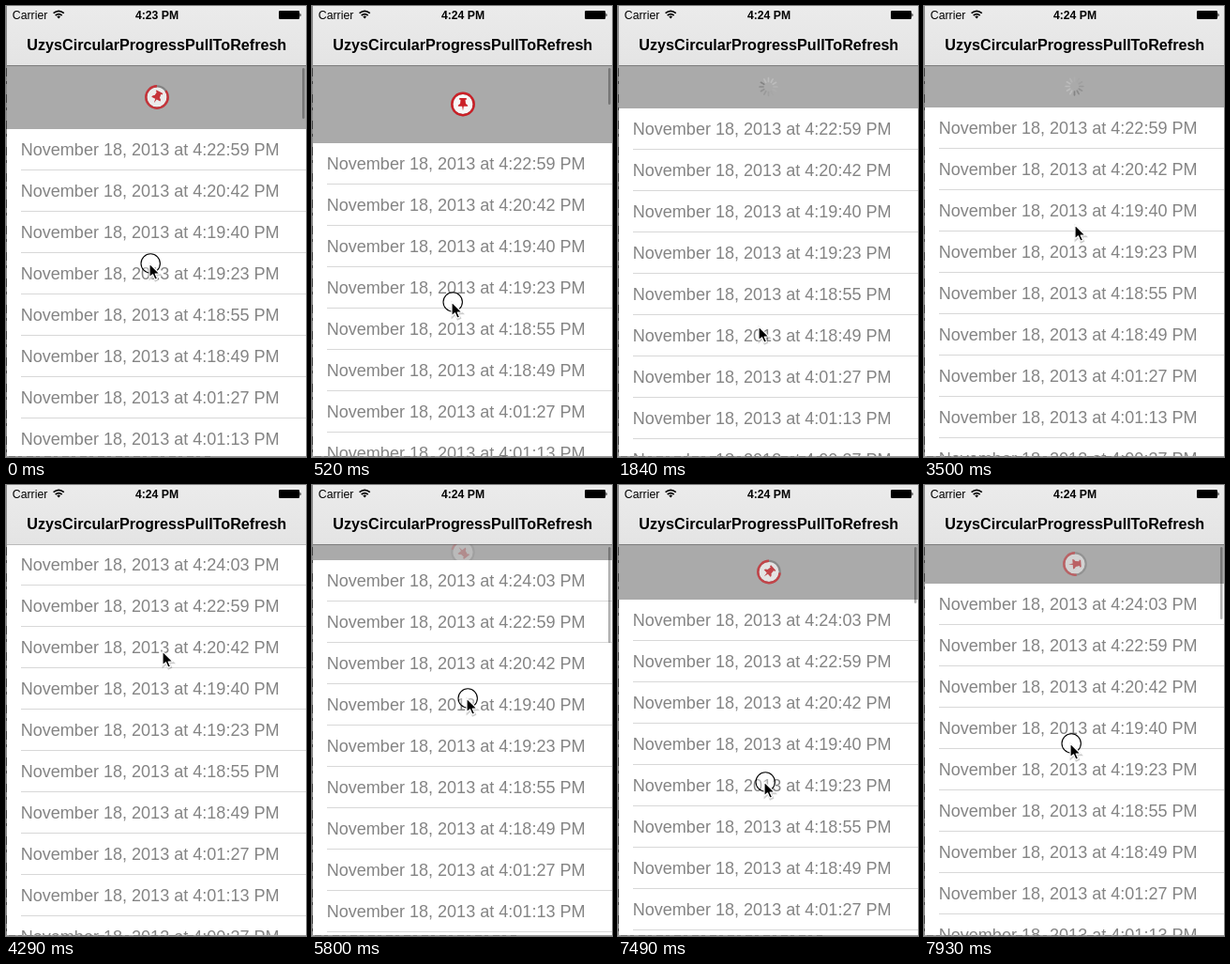
An HTML page that plays this animation: 320x480 px, repeating every 8000 ms.

```html
<!DOCTYPE html>
<html lang="en">
<head>
<meta charset="utf-8">
<title>Pull to refresh</title>
<style>
  html, body { margin: 0; width: 100%; height: 100%; overflow: hidden; background: #fff; }
  svg { display: block; width: 320px; height: 480px; }
  text { font-family: "Liberation Sans", Arial, sans-serif; }
  .row text { font-size: 18.06px; fill: #848484; }
  .bold { font-weight: bold; text-anchor: middle; }
</style>
</head>
<body>
<svg viewBox="0 0 320 480">
  <defs>
    <linearGradient id="barFill" x2="0" y2="1">
      <stop offset="0" stop-color="#ebebeb"/>
      <stop offset="1" stop-color="#e4e4e4"/>
    </linearGradient>
    <path id="arrow" d="M0 0V15l3.5-3.2 2.4 5.4 2.6-1.1-2.3-5.1H11z"/>
  </defs>
  <rect width="320" height="480" fill="#aaa"/>

  <g id="badge">
    <circle r="11.7" fill="#f8f8f8" stroke="#7d7d7d" stroke-width="2.2"/>
    <path id="pin" fill="#cb2027" d="M-3.8-6.5h7.6v1.7h-1.3l.5 4.2q2.3.9 2.3 2.9H.8L0 7-.8 2.3h-4.5q0-2 2.3-2.9l.5-4.2h-1.3z"/>
    <circle id="ring" r="11.7" fill="none" stroke="#cb2027" stroke-width="2.4" pathLength="100" transform="scale(-1 1) rotate(-90)"/>
  </g>
  <g id="spinner"></g>

  <g id="list">
    <g id="fresh"></g>
    <g id="rows"></g>
  </g>
  <rect id="bar" x="316" y="66" width="2.5" rx="1.25" fill="#000" fill-opacity=".3"/>

  <rect width="320" height="63" fill="url(#barFill)"/>
  <rect y="63" width="320" height="1" fill="#000" fill-opacity=".27"/>
  <text x="6.8" y="13.5" font-size="12.3">Carrier</text>
  <g fill="none" stroke="#000" stroke-width="1.7">
    <path d="M50.6 7.7q5.6-4.6 11.2 0M52.7 10q3.5-2.8 7 0"/>
    <path d="M56.2 13.4l-1.9-2.2q1.9-1.3 3.8 0z" fill="#000" stroke="none"/>
  </g>
  <text id="clock" class="bold" x="161" y="13.5" font-size="12.2"></text>
  <rect x="291" y="5" width="22" height="9" rx="1.2"/>
  <path d="M313.5 7.4q2.2 2.1 0 4.2z"/>
  <text class="bold" x="160.8" y="47" font-size="16.15">UzysCircularProgressPullToRefresh</text>

  <path d="M.5 0V480" stroke="#8a8a8a"/>
  <path d="M.5 66V480" stroke="#444" stroke-dasharray="9 5 3 11"/>
  <path d="M0 479.5H320" stroke="#9a9a9a"/>
  <path d="M3 479.5H218" stroke="#444" stroke-opacity=".4" stroke-dasharray="7 3 4 5"/>

  <g id="cursor">
    <circle id="touch" cx="1.2" cy="0" r="10.2" fill="#fff" fill-opacity=".35" stroke="#000" stroke-width="1.1"/>
    <use href="#arrow" x=".6" y="1.2" stroke="#000" stroke-width="2" stroke-opacity=".2" fill="none"/>
    <use href="#arrow" stroke="#fff" stroke-width="1.2" stroke-linejoin="round"/>
  </g>
</svg>
<script>
const LOOP = 8000, TOP = 63, ROW = 44, THRESHOLD = 80, HOLD = 45;
const RELEASE = 1300, LOADED = 3600, CLOSED = 4050, TOUCH = 5090, PRESS = 5270, DRAG = 5540;

// [time, value...]
const pullKeys = [[0, 68], [1050, 95], [RELEASE, 97], [1700, 47], [1840, 46], [2000, HOLD],
  [LOADED, HOLD], [CLOSED, 0], [DRAG, 0], [5800, 17], [6420, 71], [6780, 76], [7000, 77],
  [7220, 72], [7930, 42], [LOOP, 42]];
const cursorKeys = [[0, 153, 274], [1050, 147, 345], [RELEASE, 147, 349], [1840, 150, 341],
  [2500, 150, 341], [4150, 167, 177], [5000, 167, 177], [TOUCH, 166, 181], [PRESS, 166, 182],
  [DRAG, 166, 191], [5800, 165, 227], [6420, 159, 343], [6780, 156, 357], [7000, 156, 359],
  [7220, 156, 347], [7930, 156, 275], [LOOP, 156, 275]];
const times = ["22:59", "20:42", "19:40", "19:23", "18:55", "18:49", "01:27", "01:13", "00:37", "00:21"];

const $ = id => document.getElementById(id);
const clamp = (v, lo = 0, hi = 1) => Math.min(hi, Math.max(lo, v));
const show = (id, on) => $(id).setAttribute("visibility", on ? "visible" : "hidden");
const move = (id, x, y) => $(id).setAttribute("transform", `translate(${x} ${y})`);

// Monotone cubic interpolation through column c of the keys
function sample(keys, t, c = 1) {
  const slope = i => keys[i + 1] ? (keys[i + 1][c] - keys[i][c]) / (keys[i + 1][0] - keys[i][0]) : 0;
  const tangent = i => {
    if (!i) return slope(0);
    const a = slope(i - 1), b = slope(i);
    return a * b > 0 ? 2 * a * b / (a + b) : 0;
  };
  let i = 0;
  while (i < keys.length - 2 && t >= keys[i + 1][0]) i++;
  const a = keys[i], b = keys[i + 1], h = b[0] - a[0], u = (t - a[0]) / h, v = 1 - u;
  return v * v * (1 + 2 * u) * a[c] + u * u * (3 - 2 * u) * b[c]
    + h * u * v * (v * tangent(i) - u * tangent(i + 1));
}

const rowMarkup = (time, y, id) => `<g class="row" transform="translate(0 ${y})">
  <rect ${id ? `id="${id}"` : ""} width="320" height="${ROW}" fill="#fff"/>
  <rect x="16" y="43" width="304" height="1" fill="#d8d8d8"/>
  <text x="15.7" y="28">November 18, 2013 at 4:${time} PM</text></g>`;

$("fresh").innerHTML = rowMarkup("24:03", 0);
$("rows").innerHTML = times.map((time, i) => rowMarkup(time, i * ROW, i === 1 ? "pressed" : "")).join("");
$("spinner").innerHTML = Array.from({ length: 12 }, (_, i) =>
  `<path d="M0-5.5V-9.3" stroke-width="1.7" stroke-linecap="round" transform="rotate(${i * 30})"/>`).join("");
const petals = [...$("spinner").children];

function draw(t) {
  const pull = Math.round(sample(pullKeys, t));
  const progress = clamp(pull / THRESHOLD);
  const middle = TOP + pull / 2;
  const loading = t >= RELEASE && t < CLOSED;
  const inserted = t < LOADED ? 0 : t < CLOSED ? 1 - pull / HOLD : 1;

  move("list", 0, TOP + pull);
  move("rows", 0, Math.round(ROW * inserted));
  $("fresh").setAttribute("opacity", inserted);
  $("pressed").setAttribute("fill", t >= PRESS && t < DRAG ? "#d9d9d9" : "#fff");

  show("badge", !loading && pull > 0);
  move("badge", 161, middle);
  $("badge").setAttribute("opacity", progress);
  $("pin").setAttribute("transform", `rotate(${180 - 180 * progress})`);
  $("ring").setAttribute("stroke-dasharray", `${progress * 100} 100`);

  show("spinner", loading);
  move("spinner", 160.5, middle);
  $("spinner").setAttribute("opacity", 1 - inserted);
  const head = Math.floor(t / 1000 * 12);
  petals.forEach((petal, i) => {
    const age = ((head - i) % 12 + 12) % 12;
    const g = 132 + Math.min(age, 8) * 7;
    petal.setAttribute("stroke", `rgb(${g},${g},${g})`);
  });

  const fade = t < DRAG ? clamp(1 - (t - RELEASE - 150) / 300) : 1;
  $("bar").setAttribute("height", (t < LOADED ? 122 : 119) - pull);
  $("bar").setAttribute("opacity", fade);

  $("clock").textContent = t < 500 ? "4:23 PM" : "4:24 PM";
  show("touch", t < RELEASE || t >= TOUCH);
  move("cursor", Math.round(sample(cursorKeys, t, 1)), Math.round(sample(cursorKeys, t, 2)));
}

const start = performance.now();
function tick(now) {
  draw(Math.max(0, now - start) % LOOP);
  requestAnimationFrame(tick);
}
draw(0);
requestAnimationFrame(tick);
</script>
</body>
</html>
```
